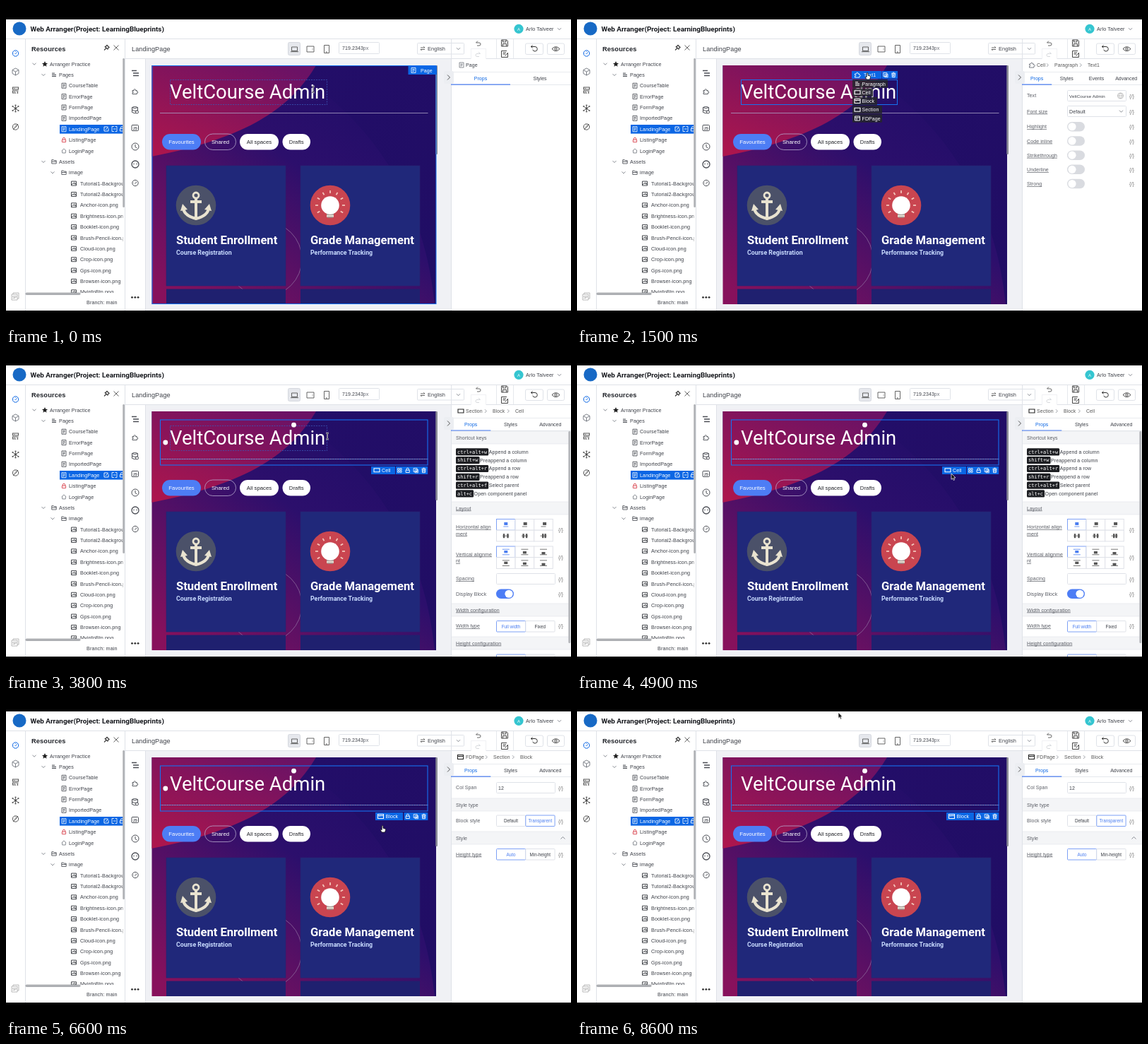
Recreate the animation shown at these times as an HTML page. Size 800x450 px, loop 8.8 s.

```html
<!DOCTYPE html>
<html lang="en">
<head>
<meta charset="utf-8">
<title>Page builder</title>
<style>
html,body{margin:0;width:100%;height:100%;overflow:hidden;background:#000}
svg{display:block;width:100vw;height:100vh}
text{font-family:"Liberation Sans",Arial,sans-serif;white-space:pre}
.ro{font-family:Roboto,sans-serif}
.mono{font-family:"DejaVu Sans Mono",monospace}
.ui{letter-spacing:.1px}
</style>
</head>
<body>
<script>
const LOOP = 8800, BLUE = '#0b66e4', LINK = '#4a7df0', INK = '#3d4048', GREY = '#6d717a', EDGE = '#dfe2e8';
const css = [];
const pct = ms => (ms / LOOP * 100).toFixed(3) + '%';

// drawing helpers
const text = (x, y, s, size = 7.2, fill = INK, weight = 400, more = 'class="ui"') =>
  `<text x="${x}" y="${y}" font-size="${size}" fill="${fill}" font-weight="${weight}" ${more}>${s}</text>`;
const mid = (x, y, s, size = 7, fill = INK, weight = 400) => text(x, y, s, size, fill, weight, 'text-anchor="middle"');
const box = (x, y, w, h, fill = 'none', stroke = 'none', rx = 0, more = '') =>
  `<rect x="${x}" y="${y}" width="${w}" height="${h}" fill="${fill}" stroke="${stroke}" rx="${rx}" ${more}/>`;
const path = (d, stroke = INK, w = 1, fill = 'none', more = '') =>
  `<path d="${d}" stroke="${stroke}" stroke-width="${w}" fill="${fill}" ${more}/>`;
const dot = (x, y, r, fill = 'none', stroke = 'none', w = 1) =>
  `<circle cx="${x}" cy="${y}" r="${r}" fill="${fill}" stroke="${stroke}" stroke-width="${w}"/>`;
const at = (x, y, s) => `<g transform="translate(${x} ${y})">${s}</g>`;
const rows = (n, f) => Array.from({ length: n }, (_, i) => f(i)).join('');

// visible between pairs of times
function show(id, spans, s) {
  const keys = spans.map(([a, b]) => `${pct(a)}{opacity:1}${b < LOOP ? pct(b) + '{opacity:0}' : ''}`).join('');
  css.push(`@keyframes ${id}{${spans[0][0] ? '0%{opacity:0}' : ''}${keys}}#${id}{animation:${id} ${LOOP}ms step-end infinite}`);
  return `<g id="${id}">${s}</g>`;
}

const icon = {
  page: c => path('M-3-3.5H3V3.5H-3ZM-1.5-1.5H1.5M-1.5 0H1.5M-1.5 1.5H.5', c, .8),
  img: c => path('M-3.5-3H3.5V3H-3.5ZM-3 2L-1-.5 1 1 2-.3 3.2 2', c, .9) + dot(1, -1.2, .7, c),
  folder: c => path('M-3.2 2.7V-2.7H-.7L.3-1.6H3.2V2.7ZM-3.2-.2H3.2', c, .8),
  lock: c => path('M-1.7-.4V-1.6a1.7 1.7 0 0 1 3.4 0V-.4M-2.6-.4H2.6V3H-2.6Z', c, .9),
  copy: c => path('M-3-3H2V2H-3ZM-1-1H3.3V3.3H-1ZM1.2 0V2.5M0 1.2H2.5', c, .8),
  trash: c => path('M-3-2.3H3M-1-3.3H1M-2.3-1.5H2.3L1.9 3.2H-1.9ZM-.7-.5V2M.7-.5V2', c, .9),
  grid: c => path('M-2.8-2.8H-.4V-.4H-2.8ZM.6-2.8H2.8V-.4H.6ZM-2.8.6H-.4V2.8H-2.8ZM.6.6H2.8V2.8H.6Z', c, .8),
  cell: c => path('M-4-2.5H4V2.5H-4Z', c, 1.1),
  block: c => path('M-4-3H4V3H-4ZM-4-1H4M-1.5-1V0', c, 1.1),
  layout: c => path('M-3.5-3H3.5V3H-3.5ZM-3.5-1H3.5M-1-1V3', c, .9),
  lines: c => path('M-3-2.2H1M-3 0H3M-3 2.2H3', c, 1),
  puzzle: c => path('M-3.5-1.5H-1.2C-2-4 1.6-4 .9-1.5H2.8V.2C5 .1 5 2.2 2.8 2V3.6H-3.5V1.8C-1.6 2-1.6 0-3.5.2Z', c, .9),
  gauge: c => dot(0, 0, 4.2, 'none', c, 1) + path('M-.5 1L2-1.5M-2.4 0H-1.8M0-2.6V-2', c, 1),
  edit: c => path('M2-3H-3V3H3V-1M-1 1L3-3', c, .9),
  save: c => path('M-4.5-4.5H3L4.5-3V4.5H-4.5ZM-2.5-4.5V-1.5H2V-4.5M-2.5 4.5V1H2.5V4.5', c, .9)
};
const put = (name, x, y, c = GREY) => at(x, y, icon[name](c));
const chevron = (x, y, c = GREY) => path(`M${x - 2.5} ${y - 1.3}l2.5 2.6 2.5-2.6`, c, .8);

function header() {
  return box(0, 19, 800, 412, '#fff') + path('M0 46.5H800', EDGE) + dot(19, 32, 9.5, '#1769c5') +
    text(34.5, 36.4, 'Web Arranger(Project: LearningBlueprints)', 9.9, '#15171c', 700, 'class="ro"') +
    dot(726, 32.3, 6.6, '#35c5d0') + mid(726, 34.5, 'A', 6, '#fff') +
    text(736, 35, 'Arlo Talveer', 7.3) + chevron(783.5, 32.5);
}

function rail() {
  return path('M27.5 46V431M168.5 46V431', EDGE) + put('gauge', 13.5, 67, BLUE) +
    at(13.5, 93, path('M0-5L4.5-2.5V2.5L0 5-4.5 2.5V-2.5ZM-4.5-2.5L0 0 4.5-2.5M0 0V5', GREY, .9)) +
    at(13.5, 119, path('M-4-4H4V-1H-4ZM4 1H-4V4H1M-2-2.5H-1M-2 2.5H-1M3 2V5', '#555', 1.1)) +
    at(13.5, 145, path('M-4-3L4 3M-4 3L4-3M0-5V5', '#555', .8) + dot(0, 0, 1.8, '#555') +
      [[-4, -3], [4, 3], [-4, 3], [4, -3], [0, -4.5], [0, 4.5]].map(p => dot(...p, 1.1, '#555')).join('')) +
    put('gauge', 13.5, 171, '#555') + path('M10 175L17 167', '#555', 1) +
    at(13, 411, path('M-5-3H3V5H-5ZM-3-3V-5H5V3H3', '#aaa', .8) + mid(-1, 3, 'SP', 4.5, '#888'));
}

function tree() {
  const y = i => 82 + i * 15.37;
  const row = (i, x, s, ic, c = INK) => put(ic, x - 7, y(i), c) + text(x, y(i) + 2.6, s, 7.2, c);
  const pages = ['CourseTable', 'ErrorPage', 'FormPage', 'ImportedPage', 'LandingPage', 'ListingPage', 'LoginPage'];
  const files = ['Tutorial1-Background', 'Tutorial2-Background', 'Anchor-icon.png', 'Brightness-icon.png', 'Booklet-icon.png',
    'Brush-Pencil-icon.png', 'Cloud-icon.png', 'Crop-icon.png', 'Gps-icon.png', 'Browser-icon.png', 'MyinfoBtn.png'];
  const home = path('M-3.2 0L0-3 3.2 0M-2.3-.5V3H2.3V-.5', GREY, .8);
  return text(36, 64, 'Resources', 9.3, '#22252b', 700) + path('M152.5 55.5l7 7m0-7l-7 7', '#555', .9) +
    path('M139 62.5L142 59.5M139.8 57.2L144.5 61.5M141 57.5L143 55.5 146 58.5 143.8 60.5', '#444', 1.3) +
    '<clipPath id="treeClip"><path d="M28 74H165.5V406H28Z"/></clipPath><g clip-path="url(#treeClip)">' +
    chevron(40, 82) + at(55, 82, path('M0-4L1.2-1.3 4-1 1.9.9 2.6 3.8 0 2.3-2.6 3.8-1.9.9-4-1-1.2-1.3Z', 'none', 0, '#222')) +
    text(62, 84.6, 'Arranger Practice') + chevron(53, y(1)) + row(1, 75, 'Pages', 'lines') +
    box(76, 168, 91, 12.6, BLUE) +
    pages.map((s, i) => i == 6 ? at(82, y(8), home) + text(89, y(8) + 2.6, s) :
      i == 5 ? put('lock', 82, y(7), '#d8434e') + text(89, y(7) + 2.6, s) :
      row(i + 2, 89, s, 'page', i == 4 ? '#fff' : INK)).join('') +
    put('edit', 142, 174, '#fff') + at(153.5, 174, path('M-.5-3.5H-3.5V3.5H-.5M1-3.5H3.5V3.5H1M-1.5 0H2', '#fff', .8)) + put('lock', 164, 174, '#fff') +
    chevron(53, y(9)) + row(9, 75, 'Assets', 'folder') + chevron(66, y(10)) + row(10, 89, 'image', 'folder') +
    files.map((s, i) => put('img', 96, y(i + 11), '#33363c') + text(105, y(i + 11) + 2.6, s)).join('') + '</g>' +
    box(165.3, 74, 2.6, 211, '#aeb0b4', 'none', 1.3) + box(27.5, 405.6, 78, 3.4, '#adafb3', 'none', 1.7) +
    text(114, 422, 'Branch: main', 7.2);
}

function toolbar() {
  return path('M169 74.5H800', EDGE) + text(178, 63.6, 'LandingPage', 9.1) +
    box(399.5, 51.5, 17, 18, '#e6e8ed', '#d5d8df', 2) +
    at(408.5, 61, path('M-4-3H4V2.5H-4ZM-5.5 3.7H5.5', '#555', .9)) +
    at(431, 61, path('M-5-4H5V4H-5ZM3-.5V.5', '#555', .9)) + at(454, 61, path('M-3.5-5.5H3.5V5.5H-3.5ZM-1 4H1', '#555', .9)) +
    box(471.5, 51.5, 57, 16, '#fff', EDGE, 1) + text(476, 62, '719.2343', 7) + text(505.5, 62, 'px', 7.4, GREY) +
    box(582.5, 52.5, 66, 15.5, '#fff', EDGE, 1) + path('M587 59H593L591.3 57.3M593 61.5H587L588.7 63.2', '#444', .8) +
    text(597, 63.2, 'English', 7.4) + chevron(640.5, 60.5) +
    box(658.5, 60.5, 21, 15, '#fff', '#f0f1f4') +
    path('M668 49.5L665.5 52H670a2 2 0 0 1 0 4H667', '#555', .9) + path('M669 65L671.5 67.5H667a2 2 0 0 0 0 4H670', '#d3d5da', .9) +
    path('M694.5 46V74M718.5 46V74', EDGE, .8) + put('save', 706, 52.5, '#333') + at(706, 68, path('M3-4.5H-4.5V4.5H4.5V-1M-2.5-2H2M-2.5 0H1M.5 2.5L5-2', '#333', .9)) +
    box(735.5, 53, 25, 15.5, '#fff', EDGE, 2) + path('M743.5 57.5H749a3.3 3.3 0 1 1-3.2 4.2M745.5 55.5L743.5 57.5 745.5 59.5', '#333', 1) +
    box(766.5, 53, 24, 15.5, '#fff', EDGE, 2) + path('M773 60.7Q778.5 54.6 784 60.7Q778.5 66.8 773 60.7Z', '#333', .9) + dot(778.5, 60.7, 1.6, 'none', '#333');
}

function parts() {
  const c = '#4b4e55';
  return box(197, 75, 434, 356, '#f0f1f5') + path('M197.5 75V431', EDGE) +
    path('M178 91.5H185M180 95H188M180 98.5H188', c, 1.5) + put('puzzle', 182.5, 121, c) +
    at(182.5, 147, path('M-4-3.5Q0-6 4-3.5V3.5Q0 6-4 3.5ZM-4-3.5Q0-1 4-3.5M-4 0Q0 2.5 3 1', c, 1) + dot(3, 3, 2, '#fff', c)) +
    box(178, 168.5, 9.5, 8, 'none', c, 1) + mid(182.8, 175, 'JS', 5, c, 700) +
    dot(183, 199, 5, 'none', c) + path('M183 196V199.5L185.5 201', c) +
    dot(183, 224, 5, 'none', c, 1.3) + dot(181, 223.5, .8, c) + dot(185, 223.5, .8, c) + put('gauge', 183, 250.5, c) +
    rows(3, i => dot(178.5 + i * 4.3, 412.3, 1.4, '#333'));
}

function site() {
  const stops = (...a) => a.map((c, i) => `<stop offset="${i / (a.length - 1)}" stop-color="${c}"/>`).join('');
  const card = (x, head, sub) => box(x, 226, 169, 170, '#20287a', '#2a2371', 0, 'stroke-width=".6"') +
    text(x + 14, 337.4, head, 16.6, '#fff', 700, 'class="ro"') + text(x + 14, 351.5, sub, 8.8, '#c9dcff', 700, 'class="ro"') +
    box(x, 400.5, 169, 22, '#1f206f');
  const pill = (x, w, s, fill, c, edge = 'none') => box(x, 181, w, 22.5, fill, edge, 11.25, 'stroke-width=".8"') + mid(x + w / 2, 195, s, 7.8, c);
  const anchor = path('M0-10V18M-8-5H8M-18 4C-17 13-8 17 0 19C8 17 17 13 18 4', '#e9e3d0', 4) + dot(0, -14, 4, 'none', '#e9e3d0', 2.8) +
    path('M-22 8L-19-2-12 6ZM22 8L19-2 12 6Z', 'none', 0, '#e9e3d0');
  const bulb = rows(9, i => `<g transform="rotate(${i * 30 - 120})">${path('M0-17V-21', '#f4c9bd', 1.7)}</g>`) +
    box(-5, 9, 10, 8, '#e3dcd0', 'none', 1) + path('M-5 13H5M-4 17H4', '#9a8f8c', 1.4) + dot(0, 0, 12.8, '#fff');
  return `<defs><linearGradient id="base" x1=".1" y1="1" x2=".8" y2=".2">${stops('#87115c', '#5b1064', '#2c0f6c', '#230e69')}</linearGradient>
    <linearGradient id="blob" x1=".8" y1="0" x2=".1" y2="1">${stops('#6b1265', '#8b1459', '#ac164d')}</linearGradient>
    <linearGradient id="dusk" x1="0" y1="0" x2="1" y2="1">${stops('#230e69', '#200d64')}</linearGradient>
    <clipPath id="pageClip"><path d="M206.5 84H609V422H206.5Z"/></clipPath></defs><g clip-path="url(#pageClip)">` +
    box(206, 84, 403, 338, 'url(#base)') + path('M395 84C470 130 587 225 607 422H609V84Z', 'none', 0, 'url(#dusk)') +
    path('M206 84H439C405 140 350 185 206 213Z', 'none', 0, 'url(#blob)') +
    dot(366, 358, 53, 'none', '#8c6a9c', .8) +
    card(227, 'Student Enrollment', 'Course Registration') + card(417, 'Grade Management', 'Performance Tracking') +
    '</g>' + path('M218 151.5H597.5', '#aaa0c5', .8) +
    text(232, 131.2, 'VeltCourse Admin', 27.5, '#fff', 400, 'class="ro"') +
    pill(221, 55, 'Favourites', '#4d7df5', '#fff') + pill(281.5, 44, 'Shared', 'none', '#fff', '#b5a8cf') +
    pill(331, 55, 'All spaces', '#fff', '#24252b') + pill(391.5, 39.5, 'Drafts', '#fff', '#24252b') +
    dot(269, 282, 28.3, '#4b5169') + at(269, 282, anchor) + dot(459, 282, 28.3, '#c94550') + at(459, 282, bulb) +
    box(608.3, 84, 2.7, 126, '#8b8c96', 'none', 1.3);
}

// right-hand property panels
const crumbs = (list, icons) => icons + list.map(([x, s], i) =>
  text(x, 86.2, s, 6.9, '#555') + (i ? path(`M${x - 11} 81.3l2.3 2.3-2.3 2.3`, GREY, .7) : '')).join('');
const tabs = (names, w) => path('M631 93.5H800', EDGE, .7) + path('M631 111.5H800', EDGE, .8) +
  names.map((s, i) => mid(630 + w * (i + .5), 104.6, s, 7, i ? INK : BLUE)).join('') + path(`M630 111.2h${w}`, LINK, 1.2);
const code = y => mid(785.5, y, '{/}', 7.4, '#777');
const label = (y, s, dotted = true) => text(637, y, s, 7, '#5a5d65', 400, `class="ui" ${dotted ? 'text-decoration="underline dotted"' : ''}`);
const field = (y, s, size = 7) => box(694.5, y, 83, 15, '#fff', EDGE, 1) + text(697, y + 10, s, size);
const pair = (y, a, b, on) => [a, b].map((s, i) => box(694.5 + i * 41.3, y, 41.3, 15.5, '#fff', i == on ? '#7da0f5' : EDGE, 1) +
  mid(715 + i * 41.3, y + 10, s, 6.3, i == on ? LINK : INK)).join('');
const band = (y, s, dotted) => box(631, y, 169, 18, '#f4f5f7') + path(`M631 ${y}h169`, EDGE, .6) + path(`M631 ${y + 18}h169`, EDGE, .6) + label(y + 11.5, s, dotted);
const knob = (y, on) => box(694, y, 25, 13.5, on ? '#4d7df5' : '#d9dbe0', 'none', 6.75) + dot(on ? 712 : 701, y + 6.75, 5.6, '#fff');

const pagePanel = put('page', 645, 83.5) + text(651, 86.2, 'Page', 7) + tabs(['Props', 'Styles'], 84);
const textPanel = crumbs([[651, 'Cell'], [676, 'Paragraph'], [723, 'Text1']], put('puzzle', 644, 83.5)) +
  tabs(['Props', 'Styles', 'Events', 'Advanced'], 42.2) +
  label(129.3, 'Text', false) + field(119.5, 'VeltCourse Admin', 6.2) + dot(769.5, 127, 4, 'none', '#aaa', .8) + path('M765.5 127H773.5M769.5 123Q766 127 769.5 131Q773 127 769.5 123', '#aaa', .6) +
  label(151.6, 'Font size') + field(141.5, 'Default') + chevron(770.5, 149) +
  ['Highlight', 'Code inline', 'Strikethrough', 'Underline', 'Strong'].map((s, i) => label(173.4 + i * 20.2, s) + knob(164 + i * 20.2) + code(173.4 + i * 20.2)).join('') +
  code(129.5) + code(151.5);

function alignGrid(y, upright) {
  return rows(6, i => {
    const x = 694.5 + i % 3 * 26.6, top = y + (i > 2 ? 15.7 : 0), c = i ? '#555' : LINK;
    return box(x, top, 26.6, 15.7, '#fff', i ? EDGE : '#7da0f5') + at(x + 13.3, top + 8,
      upright ? path('M-5-3.8H5M-5 3.8H5', c, .8) + box(-2.5, -2 + i % 3, 5, 3.4, c) :
        i > 2 ? path('M-4.5 0H4.5', c, .8) + box(-4 + i % 3, -3, 2.4, 6, c) + box(1.5, -3, 2.4, 6, c) :
          box(-2.5 + i % 3 * .8, -3.5, 5, 4, c) + path('M-3.5 2.5H3.5', c, .8));
  });
}
const keys = [['ctrl+alt+w', 'Append a column'], ['shift+w', 'Preappend a column'], ['ctrl+alt+r', 'Append a row'],
  ['shift+r', 'Preappend a row'], ['ctrl+alt+f', 'Select parent'], ['alt+c', 'Open component panel']];
const cellPanel = crumbs([[651, 'Section'], [689, 'Block'], [721, 'Cell']], '') + tabs(['Props', 'Styles', 'Advanced'], 56.3) +
  band(112, 'Shortcut keys', false) + keys.map(([k, s], i) => {
    const y = 141.3 + i * 11.8, w = k.length * 4.22 + 4;
    return box(637, y - 5, w, 10.2, '#1d1e22', 'none', 1.5) + text(639, y + 2.3, k, 7, '#fff', 400, 'class="mono"') + text(637.5 + w, y + 2.5, s, 7);
  }).join('') + band(212, 'Layout') +
  label(250, 'Horizontal align') + label(259.5, 'ment') + alignGrid(236.5) + code(254) +
  label(288.5, 'Vertical alignme') + label(298, 'nt') + alignGrid(275, true) + code(293) +
  label(323.3, 'Spacing') + field(313.5, '') + code(323.5) + label(344.8, 'Display Block', false) + knob(335.5, true) + code(344.5) +
  band(356, 'Width configuration') + label(390, 'Width type') + pair(380.5, 'Full width', 'Fixed', 0) + code(390) +
  band(403, 'Height configuration') + pair(428, '', '', 0) + box(796.3, 112, 3, 300, '#b5b7bb', 'none', 1.5);
const blockPanel = crumbs([[651, 'FDPage'], [690, 'Section'], [728, 'Block']], put('block', 643.5, 83.5, '#222')) + tabs(['Props', 'Styles', 'Advanced'], 56.3) +
  label(129.3, 'Col Span', false) + field(119.5, '12') + code(129.5) + band(142, 'Style type', false) +
  label(176.3, 'Block style', false) + pair(166, 'Default', 'Transparent', 1) + code(176.5) +
  band(189, 'Style', false) + path('M785.5 199.5l3-3 3 3', GREY, .8) + label(223.5, 'Height type') + pair(213.5, 'Auto', 'Min-height', 0) + code(223.5);

// selection marks and menus
const badge = (x, y, w, s, tx) => box(x, y, w, 11, BLUE) + text(tx, y + 8, s, 7, '#fff');
const tools = (x, y, list) => box(x, y, list.length * 11.3, 11, BLUE) + list.map((n, i) => put(n, x + 5.3 + i * 11.4, y + 5.5, '#fff')).join('');
const menu = (x, y, list) => list.map(([n, s, w], i) => box(x, y + i * 12.25, w, 11.6, '#26272d', 'none', 1, 'opacity=".88"') +
  put(n, x + 7, y + 5.8 + i * 12.25, '#fff') + text(x + 13.5, y + 8.3 + i * 12.25, s, 7, '#fff')).join('');
const outer = [['block', 'Block', 35], ['cell', 'Section', 42], ['layout', 'FDPage', 42]];
const frame = box(218.5, 96, 378.5, 64, 'none', '#1672f0', 0, 'stroke-width="1.1"') + path('M219 151.5H597', '#3f6fd0', .8, 'none', 'stroke-dasharray="2 1.5"');

function marks() {
  return show('selPage', [[0, 400]], box(207, 84.5, 402, 337, 'none', '#1672f0') + box(569.5, 85, 40.5, 12, BLUE) + put('page', 577, 91, '#fff') + text(587, 93.7, 'Page', 7, '#fff') + pagePanel) +
    show('selText', [[400, 2700]], box(232.5, 104.5, 221, 35, 'none', '#1672f0') + badge(389, 92, 42, 'Text1', 406) + put('puzzle', 397, 97.5, '#fff') + tools(431.5, 92, ['copy', 'trash']) + textPanel) +
    show('menuText', [[1200, 2700]], menu(390, 104.2, [['lines', 'Paragraph', 50], ['cell', 'Cell', 29], ...outer])) +
    show('selCell', [[2700, 5800]], frame + badge(517, 162, 34, 'Cell', 532) + tools(552, 162, ['grid', 'lock', 'copy', 'trash']) + cellPanel) +
    show('cellIcons', [[3500, 5800]], put('cell', 525, 167.3, '#fff') + put('cell', 644, 83.5, '#222')) +
    show('hoverTitle', [[0, 400], [2700, 4100]], box(232.5, 104.5, 222, 35, 'none', '#3a57b5', 0, 'stroke-width=".8" stroke-dasharray="2 1.5"')) +
    show('menuCell', [[5100, 5800]], menu(518, 174.3, outer)) +
    show('selBlock', [[5800, LOOP]], frame + badge(523, 162, 39, 'Block', 537.5) + put('block', 530.5, 167.5, '#fff') + tools(563.5, 162, ['lock', 'copy', 'trash']) + blockPanel) +
    show('topDot', [[3500, LOOP]], dot(407.5, 103.2, 3.4, '#fff')) +
    show('leftDot', [[3500, 7500]], dot(225.8, 128, 3.4, '#fff'));
}

function pointer() {
  const track = [[0, 435, 118], [500, 435, 118], [1000, 411, 95], [1700, 411, 95], [2300, 411, 121], [3500, 411, 121], [3800, 455, 119],
    [4300, 512, 158], [4900, 530, 172], [5100, 534, 169], [5400, 533, 181], [8100, 533, 181], [8600, 370, 20.5], [LOOP, 370, 20.5]];
  css.push(`@keyframes move{${track.map(([t, x, y]) => `${pct(t)}{transform:translate(${x}px,${y}px)}`).join('')}}#pointer{animation:move ${LOOP}ms ease-in-out infinite}`);
  const beam = 'M-2-4.5Q0-4.5 0-3Q0-4.5 2-4.5M0-3.5V3.5M-2 4.5Q0 4.5 0 3Q0 4.5 2 4.5';
  return '<g id="pointer">' +
    show('beam', [[0, 900], [3500, 4100]], path(beam, '#d8d5e5', 1.8) + path(beam, '#35333f', .8)) +
    show('hand', [[900, 3500], [5100, 8100]], path('M-.8 0Q.2-1 1 0V3.2L4.4 4.2Q5 5 4 7.5L3.5 9H-.8L-3 5.6Q-2.4 4.6-.8 5.6Z', '#111', .8, '#fff')) +
    show('arrow', [[4100, 5100], [8100, LOOP]], path('M0 0V8.3L1.9 6.6 3.2 9.5 4.7 8.8 3.4 6H6Z', '#fff', .7, '#111')) + '</g>';
}

const scene = header() + rail() + tree() + toolbar() + parts() + site() +
  box(630, 75, 170, 356, '#fff') + path('M630.5 46V431', EDGE) + marks() +
  box(620, 92, 14, 18, '#eceef2', 'none', 2) + path('M625 97.5l3.5 3.5-3.5 3.5', '#555', 1) +
  box(0, 431, 800, 19, '#000') + pointer();
document.head.insertAdjacentHTML('beforeend', `<style>${css.join('')}</style>`);
document.body.insertAdjacentHTML('beforeend', `<svg viewBox="0 0 800 450">${scene}</svg>`);
</script>
</body>
</html>
```
